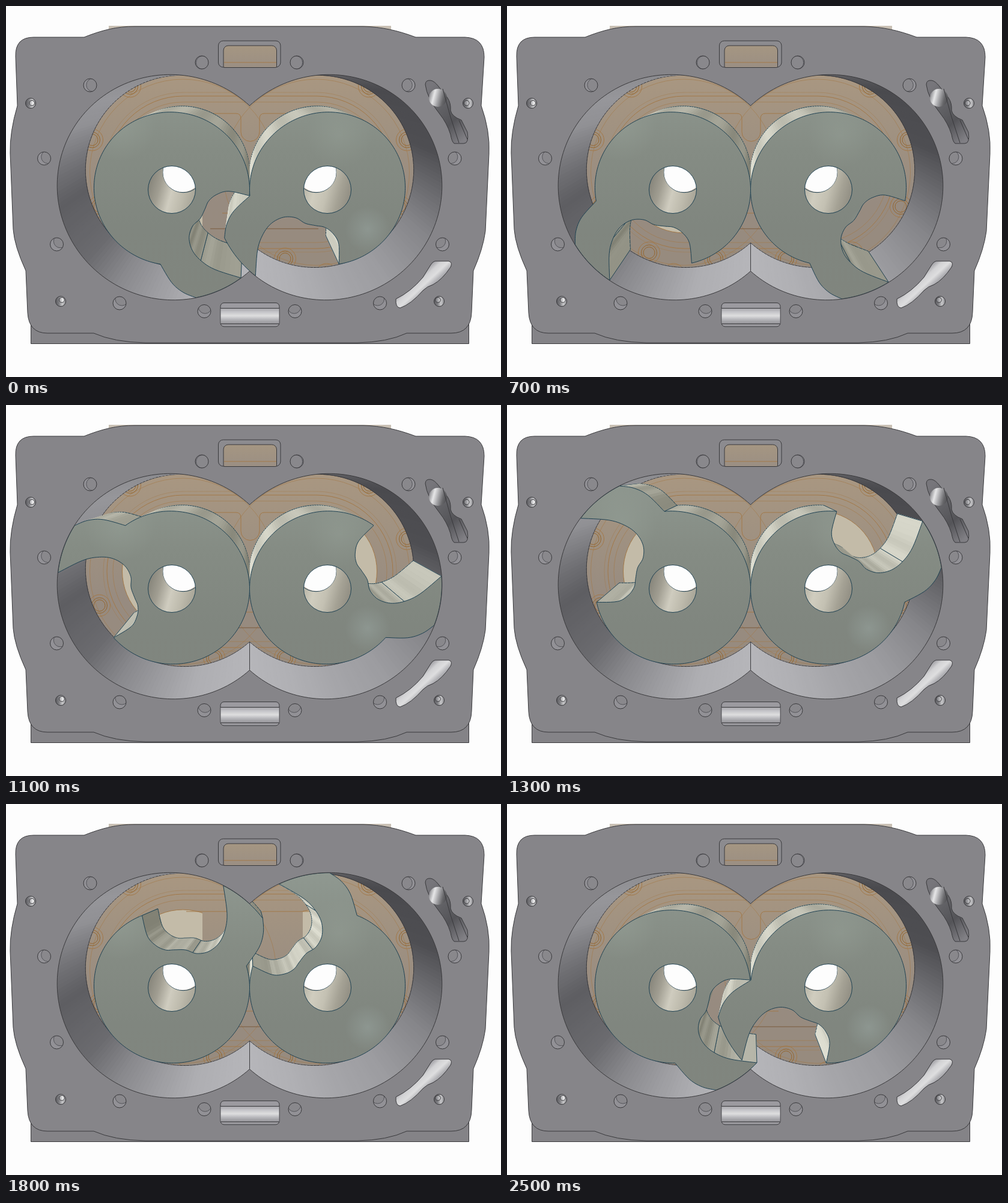
Write an HTML page with a canvas that moves like this. It is 824x618 px and loops after 2600 ms.

```html
<!DOCTYPE html>
<html>
<head>
<meta charset="utf-8">
<title>Claw pump</title>
<style>
html, body { margin: 0; width: 100%; height: 100%; overflow: hidden; background: #fdfdfd; }
canvas { display: block; }
</style>
</head>
<body>
<canvas id="c" width="824" height="618"></canvas>
<script>
const ctx = document.getElementById('c').getContext('2d');
const MID = 405.5, HALF = 129.5, BORE = 190.7, DEPTH = 0.853, VY = 109, BORE_VY = 121;
const LINE = '#39393c', EDGE = '#1f4152', BROWN = '#a27848';
const RAD = Math.PI / 180;

// Perspective: pump plane -> screen, and screen front -> screen back
function project([x, y]) {
  const w = 1 + y * 0.000111;
  return [MID + x / w, 306 + 0.984 * y / w];
}
const back = ([x, y], vy = VY) => [MID + (x - MID) * DEPTH, vy + (y - vy) * DEPTH];
const polar = ([r, a]) => [r * Math.cos(a * RAD), r * Math.sin(a * RAD)];
const grey = v => `rgb(${v},${v},${v + 4})`;

function arcPoints(r, a, b, step = 2) {
  const n = Math.ceil((b - a) / step);
  return Array.from({ length: n + 1 }, (_, i) => polar([r, a + (b - a) * i / n]));
}

function spline(pts, n = 6) {
  const out = [];
  for (let i = 0; i < pts.length - 1; i++) {
    const b = pts[i], c = pts[i + 1], a = pts[i - 1] || b, d = pts[i + 2] || c;
    for (let k = 0; k < n; k++) {
      const t = k / n;
      out.push([0, 1].map(j => b[j] + 0.5 * t * (c[j] - a[j] +
        t * (2 * a[j] - 5 * b[j] + 4 * c[j] - d[j] + t * (3 * (b[j] - c[j]) + d[j] - a[j])))));
    }
  }
  return out.concat([pts[pts.length - 1]]);
}

function lerpTable(table, x) {
  let i = 1;
  while (i < table.length - 1 && x > table[i][0]) i++;
  const [x0, y0] = table[i - 1], [x1, y1] = table[i];
  return y0 + (y1 - y0) * (x - x0) / (x1 - x0);
}

function trace(pts, close = true) {
  ctx.beginPath();
  pts.forEach(p => ctx.lineTo(p[0], p[1]));
  if (close) ctx.closePath();
}
function paint(fill, stroke, path) {
  if (fill) { ctx.fillStyle = fill; path ? ctx.fill(path) : ctx.fill(); }
  if (stroke) { ctx.strokeStyle = stroke; path ? ctx.stroke(path) : ctx.stroke(); }
}
function circle(x, y, r, fill, stroke) {
  ctx.beginPath();
  ctx.arc(x, y, r, 0, 7);
  paint(fill, stroke);
}
function line(a, b, color) {
  trace([a, b], false);
  paint(null, color);
}
function gradient(x0, y0, x1, y1, ...colors) {
  const g = ctx.createLinearGradient(x0, y0, x1, y1);
  colors.forEach((c, i) => g.addColorStop(i / (colors.length - 1), c));
  return g;
}
function roundRect(x, y, w, h, r, fill, stroke) {
  ctx.beginPath();
  ctx.roundRect(x, y, w, h, r);
  paint(fill, stroke);
}
function glow(x, y, r, color, alpha) {
  const g = ctx.createRadialGradient(x, y, 0, x, y, r);
  g.addColorStop(0, `rgba(${color},${alpha})`);
  g.addColorStop(1, `rgba(${color},0)`);
  circle(x, y, r, g);
}

// Rotor outline, clockwise from the claw tip
const pocket = [[129.5, -48.4], [95, -51.3], [75, -46.6], [64.2, -35.6], [64, -21.7], [67.8, -6.5],
  [70.9, 8.7], [86.5, 18.3], [108.5, 19.5], [130.3, 15.9], [154.6, 9.7], [190.4, 0]];
const parts = [
  arcPoints(190.4, 0, 25.5),
  spline([[190.4, 25.5], [178, 31.7], [160, 38], [129.5, 46.5]].map(polar)),
  arcPoints(129.5, 46.5, 311.6),
  spline(pocket.map(polar))
];
const profile = [], corners = new Set();
for (const part of parts) {
  corners.add(profile.length);
  profile.push(...part.slice(0, -1));
}
corners.add(profile.length - 12);
corners.add(profile.length - 32);

const bore = [[-HALF, 47.2, 312.8], [HALF, 227.2, 492.8]].flatMap(([cx, a, b]) =>
  arcPoints(BORE, a, b).map(([x, y]) => project([x + cx, y])));
const boreHalf = bore.length / 2;
const shadeLeft = [[47, 182], [80, 174], [100, 156], [120, 136], [140, 106], [170, 94], [185, 110], [212, 145], [230, 150], [313, 120]];
const shadeRight = [[227, 120], [270, 100], [300, 74], [340, 78], [358, 100], [385, 134], [415, 156], [440, 165], [465, 176], [493, 182]];

const cross = (p, q, r) => (q[0] - p[0]) * (r[1] - p[1]) - (q[1] - p[1]) * (r[0] - p[0]);

function rotorPoints(cx, angle) {
  const c = Math.cos(angle * RAD), s = Math.sin(angle * RAD);
  return profile.map(([x, y]) => project([cx + x * c - y * s, x * s + y * c]));
}

function rotorWalls(pts) {
  const walls = [];
  pts.forEach((p, i) => {
    const j = (i + 1) % pts.length, q = pts[j], pb = back(p), qb = back(q);
    if (cross(p, q, pb) >= 0) return;
    walls.push({ p, q, pb, qb, first: corners.has(i), last: corners.has(j),
      far: Math.hypot((p[0] + q[0]) / 2 - MID, (p[1] + q[1]) / 2 - VY),
      heading: Math.atan2(q[1] - p[1], q[0] - p[0]) });
  });
  return walls;
}

// Walls facing left are bright, those facing right are dim
function drawWall(w) {
  const v = Math.round(176 - 38 * Math.sin(w.heading) + 10 * Math.sin(w.heading * 13));
  const color = `rgb(${v},${v},${v - 13})`;
  trace([w.p, w.q, w.qb, w.pb]);
  paint(color, color);
  line(w.pb, w.qb, EDGE);
  if (w.first) line(w.p, w.pb, EDGE);
  if (w.last) line(w.q, w.qb, EDGE);
}

function drawShaftHole(side) {
  const x = MID + side * HALF, bx = MID + side * HALF * DEPTH;
  const tones = side < 0 ? ['#858379', '#a19e92', '#cfccbf', '#bdbaac', '#a5a295']
    : ['#b4b1a3', '#d0cdbf', '#c4c1b3', '#a5a295', '#8f8c81'];
  ctx.save();
  circle(x, 306, 39.5, gradient(x - 40, 296, x + 40, 318, ...tones));
  ctx.clip();
  circle(bx, 277, 33.7, '#cbbcae', EDGE);
  ctx.clip();
  circle(bx + side * 1.5, 276, 33.7, '#fdfdfd');
  ctx.restore();
  circle(x, 306, 39.5, null, EDGE);
}

function stadium(r, color) {
  ctx.beginPath();
  ctx.roundRect(295 - r, 277 - r, 222 + 2 * r, 2 * r, r);
  paint(null, color);
}

function drawFloor() {
  ctx.fillStyle = gradient(0, 115, 0, 436, '#a99781', '#9f9181', '#978b80', '#978b7e');
  ctx.fillRect(80, 110, 650, 385);
  for (const s of [-1, 1]) {
    ctx.save();
    ctx.beginPath();
    ctx.rect(s < 0 ? 100 : 494, 100, 227, s < 0 ? 300 : 200);
    ctx.clip();
    circle(MID + s * 111, 277, 101, '#c3bba8', BROWN);
    ctx.restore();
    circle(MID + s * 111, 277, 155, null, 'rgba(162,120,72,.6)');
    for (const [x, y] of [[59, 421], [169, 411], [250, 334], [262, 223], [199, 134], [128, 447]]) {
      const bx = MID + s * x;
      circle(bx, y, 18, null, BROWN);
      circle(bx, y, 13, null, '#94662f');
      circle(bx, y, 9.5, null, '#94662f');
    }
  }
  [[127, BROWN], [117, 'rgba(162,120,72,.6)'], [133, 'rgba(162,120,72,.45)']].forEach(a => stadium(...a));
  paint(null, BROWN, new Path2D('M300 179H383Q391 179 391 188V210A15.5 15.5 0 0 0 422 210V188Q422 179 430 179H512M360 345H452'));
  line([340, 371], [520, 371], '#7b5a3c');
}

function drawBore() {
  bore.forEach((p, i) => {
    const q = bore[(i + 1) % bore.length], pb = back(p, BORE_VY), qb = back(q, BORE_VY);
    if (cross(p, q, pb) <= 0) return;
    const right = i >= boreHalf;
    const t = (i % boreHalf) / (boreHalf - 1) * 265.6;
    const v = Math.round(right ? lerpTable(shadeRight, 227.2 + t) : lerpTable(shadeLeft, 47.2 + t));
    const color = grey(v);
    trace([p, q, qb, pb]);
    paint(color, color);
    line(pb, qb, LINE);
  });
  line(bore[0], back(bore[0], BORE_VY), LINE);
}

const body = new Path2D('M16 84Q15 52 46 52H130C160 40 185 34 214 34H595C625 35 650 40 682 52H764Q796 53 796 85' +
  'L791 166Q806 208 804 246L798 375Q794 405 778 441L775 510Q774 545 741 545H667Q635 560 585 561H232' +
  'Q180 560 146 545H69Q38 545 36 511L33 441Q14 400 12 372L7 245Q6 210 19 166Z');
const upperSlot = new Path2D('M698 131Q698 123 707 124Q713 125 720 134L735 153Q741 162 740 174Q742 184 758 190L768 210' +
  'Q771 229 762 229H746Q742 226 740 214Q734 195 722 180Q701 154 698 131Z');
const lowerSlot = new Path2D('M714 425H737Q744 427 740 435Q726 456 711 464Q701 467 694 474Q674 497 656 503' +
  'Q648 502 649 488Q674 476 694 452L707 431Q710 426 714 425Z');

function drawHole(x, y, r, small) {
  const dx = (MID - x) * 0.018, dy = (VY - y) * 0.018;
  ctx.save();
  circle(x, y, r, small ? gradient(x - r, y, x + r, y, '#5c5c60', '#7c7c80', '#c8c8ca', '#8f8f93') : '#929196');
  ctx.clip();
  if (small) circle(x + dx / 3, y + dy / 3, r * 0.5, gradient(x - 4, y, x + 4, y, '#8c8c90', '#eeeeef'), LINE);
  else circle(x + dx, y + dy, r, '#89888c', '#55555a');
  ctx.restore();
  circle(x, y, r, null, LINE);
}

function drawBody() {
  ctx.fillStyle = '#fdfdfd';
  ctx.fillRect(0, 0, 824, 618);
  ctx.fillStyle = '#c9c0b4';
  ctx.fillRect(171, 33, 470, 8);
  ctx.beginPath();
  ctx.rect(41.5, 525.5, 729, 37);
  paint('#848387', LINE);
  paint('#868589', LINE, body);

  roundRect(353.5, 58, 103.5, 44, 8, '#8c8b8f', LINE);
  ctx.beginPath();
  ctx.roundRect(362, 66, 88.5, 36.5, [8, 8, 2, 2]);
  paint(gradient(0, 66, 0, 102, '#a59682', '#9b8f83'), LINE);
  line([363, 94], [450, 94], BROWN);

  roundRect(357, 494.5, 98, 39.5, 6, '#9b9a9f', LINE);
  ctx.fillStyle = gradient(0, 503, 0, 529, '#a2a1a6', '#c4c4c8', '#dededf', '#b4b4b8', '#949398');
  ctx.fillRect(357.5, 503, 97, 26);
  line([357, 503.5], [455, 503.5], LINE);
  line([357, 529.5], [455, 529.5], LINE);

  for (const [x, y] of [[326, 94], [484, 94], [140, 132], [670, 132], [63.5, 254], [747, 254], [84.5, 397],
    [726.5, 397], [189, 495], [622.5, 495], [330, 508.5], [481, 508.5]]) drawHole(x, y, 11, false);
  for (const [x, y] of [[41, 162], [769, 162], [91, 492], [721, 492]]) drawHole(x, y, 8.5, true);

  paint(gradient(700, 140, 770, 215, '#77767b', '#636367', '#545458', '#807f84'), LINE, upperSlot);
  circle(719, 153, 15, gradient(704, 150, 735, 158, '#8c8c90', '#e6e6e7', '#a5a5a8', '#68686b', '#4b4b4e'));
  line([727, 138], [740, 185], LINE);
  line([740, 185], [754, 228], LINE);
  line([754, 190], [768, 222], LINE);
  paint(gradient(680, 455, 704, 481, '#a09fa4', '#d2d2d4', '#dededf', '#b0b0b4', '#8a898e'), LINE, lowerSlot);
}

// Claw angle of the left rotor over one turn: [ms, degrees]
const keys = [[0, 52.9], [400, 85.3], [700, 125], [1100, 188.2], [1500, 248.2], [2100, 345.3], [2500, 402.6]];
const LOOP = 2600;
function key(i) {
  const n = keys.length, turn = Math.floor(i / n), [t, a] = keys[i - turn * n];
  return [t + turn * LOOP, a + turn * 360];
}
function slope(i) {
  const [a, b, c] = [key(i - 1), key(i), key(i + 1)], h = b[0] - a[0], k = c[0] - b[0];
  return ((b[1] - a[1]) / h * k + (c[1] - b[1]) / k * h) / (h + k);
}
function clawAngle(ms) {
  let i = 0;
  while (key(i + 1)[0] <= ms) i++;
  const [t0, a0] = key(i), [t1, a1] = key(i + 1), h = t1 - t0, u = (ms - t0) / h;
  const w = u * u * (3 - 2 * u);
  return a0 + (a1 - a0) * w + h * u * (1 - u) * ((1 - u) * slope(i) - u * slope(i + 1));
}

function draw(ms) {
  const angle = clawAngle(ms);
  ctx.lineWidth = 1;
  ctx.lineJoin = 'round';
  drawBody();
  ctx.save();
  trace(bore);
  ctx.clip();
  drawFloor();
  drawBore();
  const rotors = [rotorPoints(-HALF, angle), rotorPoints(HALF, 181.8 - angle)];
  rotors.flatMap(rotorWalls).sort((a, b) => b.far - a.far).forEach(drawWall);
  for (const pts of rotors) {
    ctx.save();
    trace(pts);
    paint(gradient(0, 115, 0, 490, '#8f9890', '#858c84', '#80867f', '#80857e'));
    ctx.clip();
    glow(190, 200, 60, '160,172,162', 0.3);
    glow(555, 215, 55, '160,172,162', 0.25);
    glow(602, 372, 38, '160,174,170', 0.4);
    ctx.restore();
    trace(pts);
    paint(null, EDGE);
  }
  drawShaftHole(-1);
  drawShaftHole(1);
  ctx.restore();
  trace(bore);
  paint(null, LINE);
}

let start, shown = -1;
function tick(now) {
  start ??= now;
  const ms = Math.floor((now - start) % LOOP / 100) * 100;
  if (ms !== shown) draw(shown = ms);
  requestAnimationFrame(tick);
}
requestAnimationFrame(tick);
</script>
</body>
</html>
```
